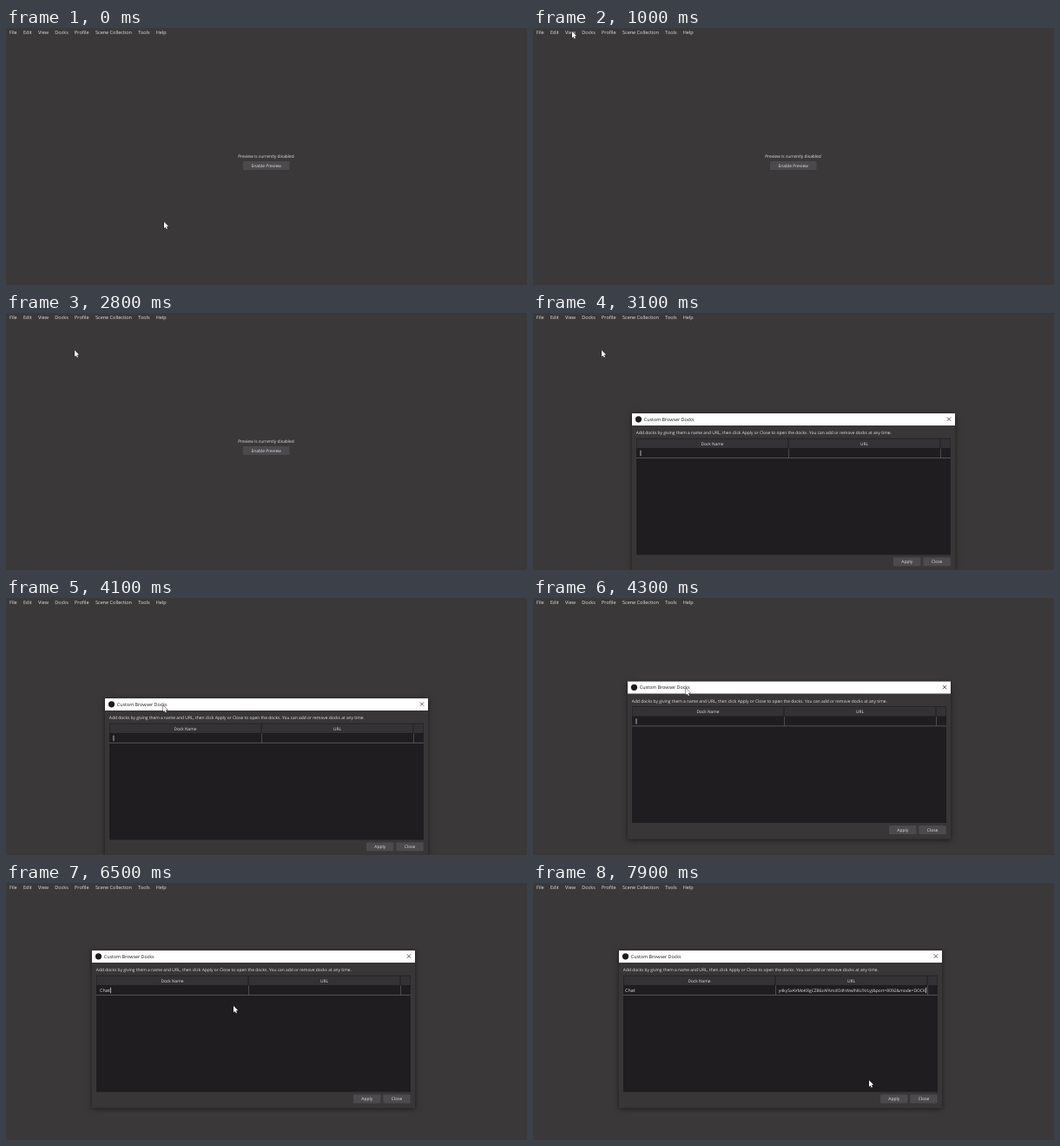
Recreate the animation shown at these times as an HTML page with a canvas. Size 600 px wide and 297 px high, loop 8 s.

```html
<!DOCTYPE html>
<html lang="en">
<head>
<meta charset="utf-8">
<title>Custom Browser Docks</title>
<style>
html, body { margin: 0; width: 100%; height: 100%; overflow: hidden; background: #3a3839; }
canvas { display: block; }
</style>
</head>
<body>
<canvas id="stage" width="600" height="297"></canvas>
<script>
const ctx = document.getElementById('stage').getContext('2d');
const LOOP = 8000, STEP = 100;
const BG = '#3a3839', INK = '#e4e3e4';
const FONT = '"Open Sans", "Noto Sans", sans-serif';

// Times of the hard changes, in ms
const MENU_OPEN = 1300, MENU_CLOSE = 2700, DIALOG_OPEN = 2900;
const NAME_CLICK = 4900, URL_CLICK = 6800, PASTE = 7200;
const KEY_TIMES = [5700, 5900, 6100, 6200];
const NAME = 'Chat';
const URL_TAIL = 'y4ky5xAVMoKRgCZB6zAfAmdO4hWwlh8LfXrLyJ&port=8092&mode=DOCK';

// [time, x, y]
const POINTER = [
  [400, 182, 224], [1000, 45, 4], [1300, 64, 8], [1800, 64, 8],
  [2200, 85, 42], [2300, 79, 43], [3200, 79, 43], [3600, 160, 112],
  [3900, 181, 124], [4100, 181, 124], [4300, 176, 104.5], [4500, 166, 86],
  [4600, 166, 86], [4900, 169, 124], [5100, 226, 124], [6300, 226, 124],
  [6500, 262, 142], [6800, 298, 124], [7200, 298, 124], [7600, 324, 203],
  [7800, 324, 203], [7900, 387, 228]
];
const DIALOG = [[4100, 114, 116], [4300, 109, 96.5], [4500, 99, 78]];

const MENU_BAR = [
  ['File', 4], ['Edit', 20], ['View', 37], ['Docks', 56.3], ['Profile', 79],
  ['Scene Collection', 103], ['Tools', 152.3], ['Help', 172.7]
];
const MENU = [['Lock UI', 16.3], ['Reset UI', 27], ['Custom Browser Docks...', 41.8]];
const DOCKS = ['Scenes', 'Sources', 'Audio Mixer', 'Scene Transitions', 'Controls', 'Stats'];

const clamp = v => Math.max(0, Math.min(1, v));

function along(path, t) {
  const i = path.findIndex(p => p[0] > t);
  if (i === 0) return path[0].slice(1);
  if (i < 0) return path[path.length - 1].slice(1);
  const [a, b] = [path[i - 1], path[i]];
  const k = (t - a[0]) / (b[0] - a[0]);
  return [a[1] + (b[1] - a[1]) * k, a[2] + (b[2] - a[2]) * k];
}

function rect(x, y, w, h, color) {
  ctx.fillStyle = color;
  ctx.fillRect(x, y, w, h);
}

// y is the middle of the capital letters
function text(str, x, y, size = 4.9, align = 'left', color = INK) {
  ctx.font = `${size}px ${FONT}`;
  ctx.textAlign = align;
  ctx.fillStyle = color;
  ctx.fillText(str, x, y + size * 0.36);
}

function line(points, color, width) {
  ctx.beginPath();
  points.forEach(([x, y]) => ctx.lineTo(x, y));
  ctx.strokeStyle = color;
  ctx.lineWidth = width;
  ctx.stroke();
}

function button(label, x, y, w, h) {
  ctx.beginPath();
  ctx.roundRect(x, y, w, h, 1);
  ctx.fillStyle = '#4c4a4c';
  ctx.fill();
  text(label, x + w / 2, y + h / 2, 4.9, 'center');
}

function shadowed(draw, blur, alpha, dx, dy) {
  ctx.save();
  ctx.shadowColor = `rgba(0,0,0,${alpha})`;
  ctx.shadowBlur = blur;
  ctx.shadowOffsetX = dx;
  ctx.shadowOffsetY = dy;
  draw();
  ctx.restore();
}

function drawMain() {
  rect(0, 0, 600, 297, BG);
  MENU_BAR.forEach(([label, x]) => text(label, x, 5.2, 5.5));
  text('Preview is currently disabled', 299.5, 148, 4.9, 'center');
  button('Enable Preview', 273, 154, 53.5, 10);
}

function drawMenu(t) {
  if (t < MENU_OPEN || t >= MENU_CLOSE) return;
  ctx.save();
  ctx.globalAlpha = clamp((t - MENU_OPEN + 100) / 200);
  shadowed(() => rect(54, 11, 89, 103.5, '#383637'), 2, 0.7, 1, 1);
  [34.5, 48.5].forEach(y => rect(56, y, 85, 0.6, '#434143'));
  MENU.forEach(([label, y]) => text(label, 62, y, 5.35));
  DOCKS.forEach((label, i) => {
    const y = 56.4 + i * 10.4;
    text(label, 62, y, 5.35);
    line([[55.2, y], [56.5, y + 1.4], [59, y - 1.7]], INK, 0.9);
  });
  ctx.restore();
}

function caret(x, y) {
  rect(x, y - 3.2, 0.7, 6.4, '#f0f0f0');
}

function drawCells(t, x, y) {
  const cy = y + 46;
  const typed = KEY_TIMES.filter(k => k <= t).length;
  if (t < URL_CLICK) {
    const start = [DIALOG_OPEN, NAME_CLICK + 50, ...KEY_TIMES].filter(s => s <= t).pop();
    const word = NAME.slice(0, typed);
    text(word, x + 9, cy, 5.4);
    ctx.font = `5.4px ${FONT}`;
    const end = ctx.measureText(word).width;
    const blinkOn = (t - start) % 1060 < 530;
    if (blinkOn) caret(x + 9.6 + end, cy);
    return;
  }
  text(NAME, x + 7, cy, 5.4);
  if (t < PASTE) {
    caret(x + 184, cy);
    return;
  }
  ctx.save();
  ctx.beginPath();
  ctx.rect(x + 182, y + 40, 173, 12);
  ctx.clip();
  text(URL_TAIL, x + 353, cy, 4.95, 'right');
  caret(x + 353.4, cy);
  ctx.restore();
}

function drawDialog(t) {
  if (t < DIALOG_OPEN) return;
  const [x, y] = along(DIALOG, t);
  ctx.save();
  ctx.globalAlpha = clamp((t - DIALOG_OPEN + 100) / 200);
  shadowed(() => rect(x, y, 372, 182, '#383637'), 6, 0.5, 0, 1);

  rect(x, y, 372, 14, '#ffffff');
  ctx.beginPath();
  ctx.arc(x + 7.5, y + 6.8, 3.6, 0, Math.PI * 2);
  ctx.fillStyle = '#1c1b1d';
  ctx.fill();
  text('Custom Browser Docks', x + 13.8, y + 6.9, 5.36, 'left', '#161616');
  const [cx, cy] = [x + 365, y + 6.6];
  line([[cx - 2.2, cy - 2.2], [cx + 2.2, cy + 2.2]], '#222', 0.7);
  line([[cx - 2.2, cy + 2.2], [cx + 2.2, cy - 2.2]], '#222', 0.7);

  text('Add docks by giving them a name and URL, then click Apply or Close to open the docks. ' +
    'You can add or remove docks at any time.', x + 4.8, y + 22.6);

  rect(x + 5, y + 28.8, 362, 134.7, '#1f1d20');
  [[5.5, 174], [180.5, 174], [355.5, 11]].forEach(([dx, w]) =>
    rect(x + dx, y + 29.5, w, 10.5, '#343235'));
  text('Dock Name', x + 92.5, y + 35.1, 4.8, 'center');
  text('URL', x + 267.5, y + 35.1, 4.8, 'center');
  rect(x + 5, y + 51.1, 362, 0.7, '#69676a');
  [180.2, 355.2].forEach(dx => rect(x + dx, y + 40.5, 0.7, 11, '#605e61'));
  drawCells(t, x, y);

  button('Apply', x + 301, y + 166.5, 31.5, 10);
  button('Close', x + 335.3, y + 166.5, 31.5, 10);
  ctx.restore();
}

function drawArrow(x, y) {
  const shape = [[0, 0], [0, 7.4], [1.7, 5.9], [2.8, 8.5], [4, 8], [2.9, 5.5], [5.2, 5.3]];
  ctx.beginPath();
  shape.forEach(([dx, dy]) => ctx.lineTo(x + dx, y + dy));
  ctx.closePath();
  ctx.strokeStyle = '#111';
  ctx.lineWidth = 0.8;
  ctx.stroke();
  ctx.fillStyle = '#fff';
  ctx.fill();
}

function drawBeam(x, y) {
  rect(x - 0.4, y - 3.3, 0.8, 6.6, '#e8e8e8');
  [-3.6, 2.9].forEach(dy => rect(x - 1.5, y + dy, 3, 0.7, '#e8e8e8'));
}

function drawPointer(t) {
  const [x, y] = along(POINTER, t);
  const [dx, dy] = along(DIALOG, t);
  const overRow = t > DIALOG[2][0] && y > dy + 40.5 && y < dy + 51.5 && x > dx + 5 && x < dx + 355;
  (overRow ? drawBeam : drawArrow)(x, y);
}

function render(t) {
  drawMain();
  drawMenu(t);
  drawDialog(t);
  drawPointer(t);
}

ctx.textRendering = 'geometricPrecision';
const begin = performance.now();
function tick() {
  const t = (performance.now() - begin) % LOOP;
  render(Math.floor(t / STEP) * STEP);
  requestAnimationFrame(tick);
}
tick();
</script>
</body>
</html>
```
